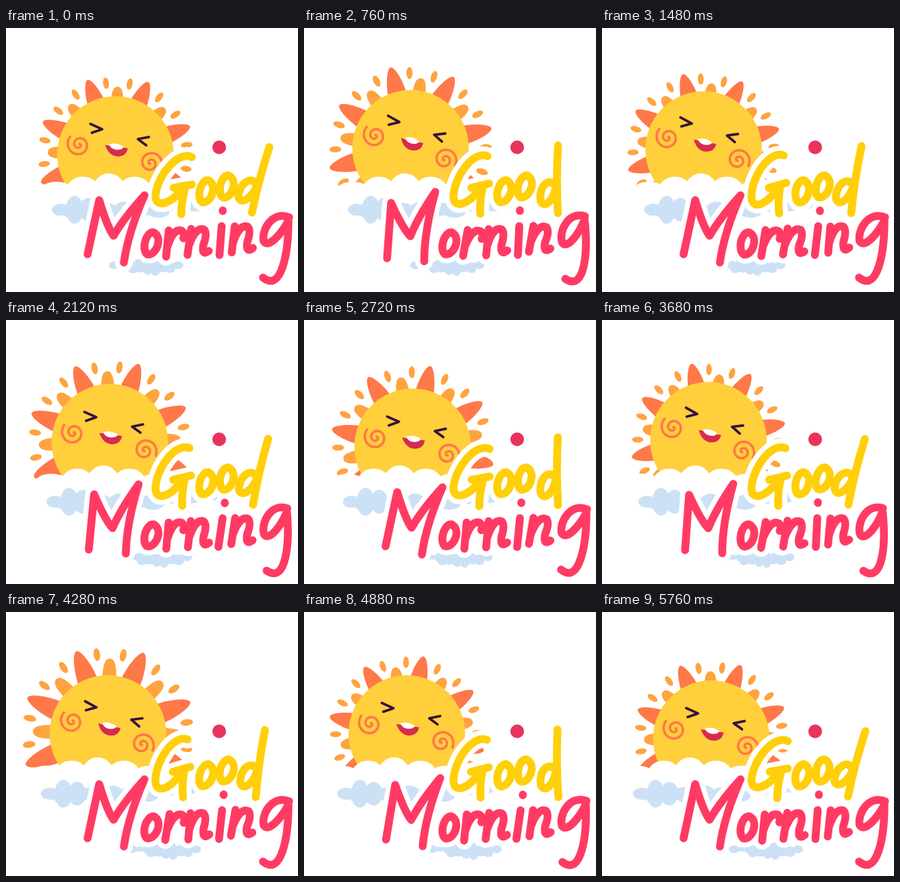
An HTML page with a canvas that plays this animation: 426 by 385 pixels, repeating every 5.8 s.

```html
<!DOCTYPE html>
<html lang="en">
<head>
<meta charset="utf-8">
<title>Good Morning</title>
<style>
html, body { margin: 0; width: 100%; height: 100%; overflow: hidden; background: #fff; }
canvas { display: block; }
</style>
</head>
<body>
<canvas id="stage" width="426" height="385"></canvas>
<script>
const ctx = document.getElementById('stage').getContext('2d');
const LOOP = 5800, TAU = Math.PI * 2, RAD = Math.PI / 180;
const YELLOW = '#ffcf0a', PINK = '#ff3b64', CORAL = '#ff7849', ORANGE = '#ffa340', BLUE = '#cce1f5';
ctx.lineCap = ctx.lineJoin = 'round';

// cosine that completes n cycles per loop and peaks at the given time
const wave = (t, n, peak) => Math.cos(TAU * n * (t - peak) / LOOP);
// the same rhythm as a short 0..1 bump
const bump = (t, n, peak, sharp) => ((1 + wave(t, n, peak)) / 2) ** sharp;

function fill(color, path) {
  ctx.fillStyle = color;
  ctx.fill(new Path2D(path));
}

function stroke(color, width, path) {
  ctx.strokeStyle = color;
  ctx.lineWidth = width;
  ctx.stroke(new Path2D(path));
}

function oval(color, x, y, rx, ry = rx) {
  const p = new Path2D();
  p.ellipse(x, y, rx, ry, 0, 0, TAU);
  fill(color, p);
}

function within(x, y, deg, draw, scale = 1) {
  ctx.save();
  ctx.translate(x, y);
  ctx.rotate(deg * RAD);
  ctx.scale(scale, scale);
  draw();
  ctx.restore();
}

// ray pointing up, from inside the disc to a rounded tip
function ray(color, half, tip) {
  fill(color, `M${-half} -70C${-half} -90 -6 ${-tip} 0 ${-tip}C6 ${-tip} ${half} -90 ${half} -70Z`);
}

function rays() {
  for (let a = 0; a < 360; a += 45) {
    within(0, 0, a, () => ray(CORAL, 13, 114));
    within(0, 0, a + 22.5, () => ray(ORANGE, 9, 97));
    for (const side of [-13, 13])
      within(0, 0, a + side, () => oval(ORANGE, 0, -103, 4.2, 8.2));
  }
}

// spiral whose outer end points at the given angle
function spiral(x, y, end) {
  const p = new Path2D();
  for (let a = 0; a <= 11; a += 0.15) {
    const r = 1 + a * 1.5, turn = a - 11 + end * RAD;
    p.lineTo(x + r * Math.cos(turn), y + r * Math.sin(turn));
  }
  stroke(CORAL, 3.6, p);
}

function face() {
  oval('#ffcf3c', 0, 0, 85);
  spiral(-53, -15, 225);
  spiral(51, 13, 30);
  stroke('#35123b', 3.6, 'M-36 -45L-19 -37L-34 -32M49 -25L33 -22L45 -13');
  fill('#d62c4e', 'M-15 -14Q2 -10 18 -9Q16 3 3 3Q-10 2 -15 -14Z');
  fill('#fff', 'M-9 -15Q2 -18 12 -11Q10 -6 1 -7Q-7 -8 -9 -15Z');
}

function sun(t) {
  const x = 154 + 6 * wave(t, 2, 150);
  const y = 179 + 4 * wave(t, 2, -200) + 2 * wave(t, 4, -100);
  const tilt = 1.2 + 3.2 * wave(t, 2, 1000);
  within(x, y, tilt + 25 + 360 * t / LOOP, rays, 1 + 0.13 * bump(t, 3, 470, 3));
  within(x, y, tilt, face);
}

// row of puffs, tallest in the middle; rough varies their heights
function cumulus(color, x, y, w, h, n, rough = 0) {
  for (let i = 0; i < n; i++) {
    const u = (i + 0.5) / n;
    const ry = h * (0.5 + 0.5 * Math.sin(Math.PI * u) ** 2) * (1 + rough * Math.cos(i * 2.4));
    oval(color, x + w * u, y, w / n * 0.65, ry);
  }
}

function clouds(t) {
  const p = t / LOOP;
  within(-22 * p, 0, 0, () => {
    fill('#fff', 'M30 242H320V312H30Z');
    cumulus('#fff', 55, 239, 190, 27, 5);
    cumulus(BLUE, 70, 265, 80, 19, 4, -0.2);
    cumulus(BLUE, 85, 268, 150, 13, 6, 0.3);
    cumulus(BLUE, 190, 260, 125, 8, 5, 0.2);
  });
  within(35 * p, 0, 0, () => {
    cumulus(BLUE, 152, 346, 105, 8, 9, 0.4);
    cumulus(BLUE, 180, 352, 65, 8, 6, 0.3);
  });
}

// pen strokes around each letter's own centre
const ARCH = 'M-10 -18L-15 20M-13 6Q-3 -22 9 -17';
const GLYPHS = {
  G: 'M23 -59C3 -68 -26 -30 -27 0C-26 21 0 8 13 -14M-1 -13L25 -19M16 -15Q11 6 12 25',
  o: 'M2 -17C-9 -18 -16 8 -7 15C6 18 17 -10 2 -17',
  d: 'M9 -53Q0 -3 -3 45M-1 6C-10 -11 -27 5 -26 24C-22 37 -8 27 -1 6',
  M: 'M-42 13L-25 -66Q-13 -26 -4 -14Q11 -40 41 -73Q17 -18 11 25',
  r: ARCH + 'Q14 -13 11 -6',
  n: ARCH + 'Q14 -11 8 5Q5 22 16 14',
  i: 'M2 -20L-2 22M4 -43V-42',
  g: 'M17 -29C-7 -39 -24 -10 -20 6C-13 17 6 -5 16 -24Q16 25 5 50Q-5 72 -21 59'
};

const SWINGS = {
  d: t => 8 * wave(t, 3, -40),
  M: t => -8 * bump(t, 4, 770, 4),
  g: t => -6 * bump(t, 4, 770, 4)
};

function word(t, text, xs, y, rise, color, width) {
  [...text].forEach((c, i) => {
    const angle = SWINGS[c] ? SWINGS[c](t) : 3 * wave(t, 2 + i % 2, 500 * i);
    within(xs[i], y - rise * i, angle, () => stroke(color, width, GLYPHS[c]));
  });
}

function lettering(t, top, bottom, width) {
  word(t, 'Good', [245, 293, 323, 368], 246, 7, top, width);
  word(t, 'Morning', [161, 213, 248, 280, 313, 344, 396], 317, 2, bottom, width);
}

const start = performance.now();

function frame(now) {
  const t = Math.floor(Math.max(0, now - start) % LOOP / 40) * 40;
  ctx.clearRect(0, 0, 426, 385);
  sun(t);
  clouds(t);
  lettering(t, '#fff', '#fff', 26);
  oval('#e8335a', 311, 174, 10);
  lettering(t, YELLOW, PINK, 11.5);
  requestAnimationFrame(frame);
}
frame(start);
</script>
</body>
</html>
```
